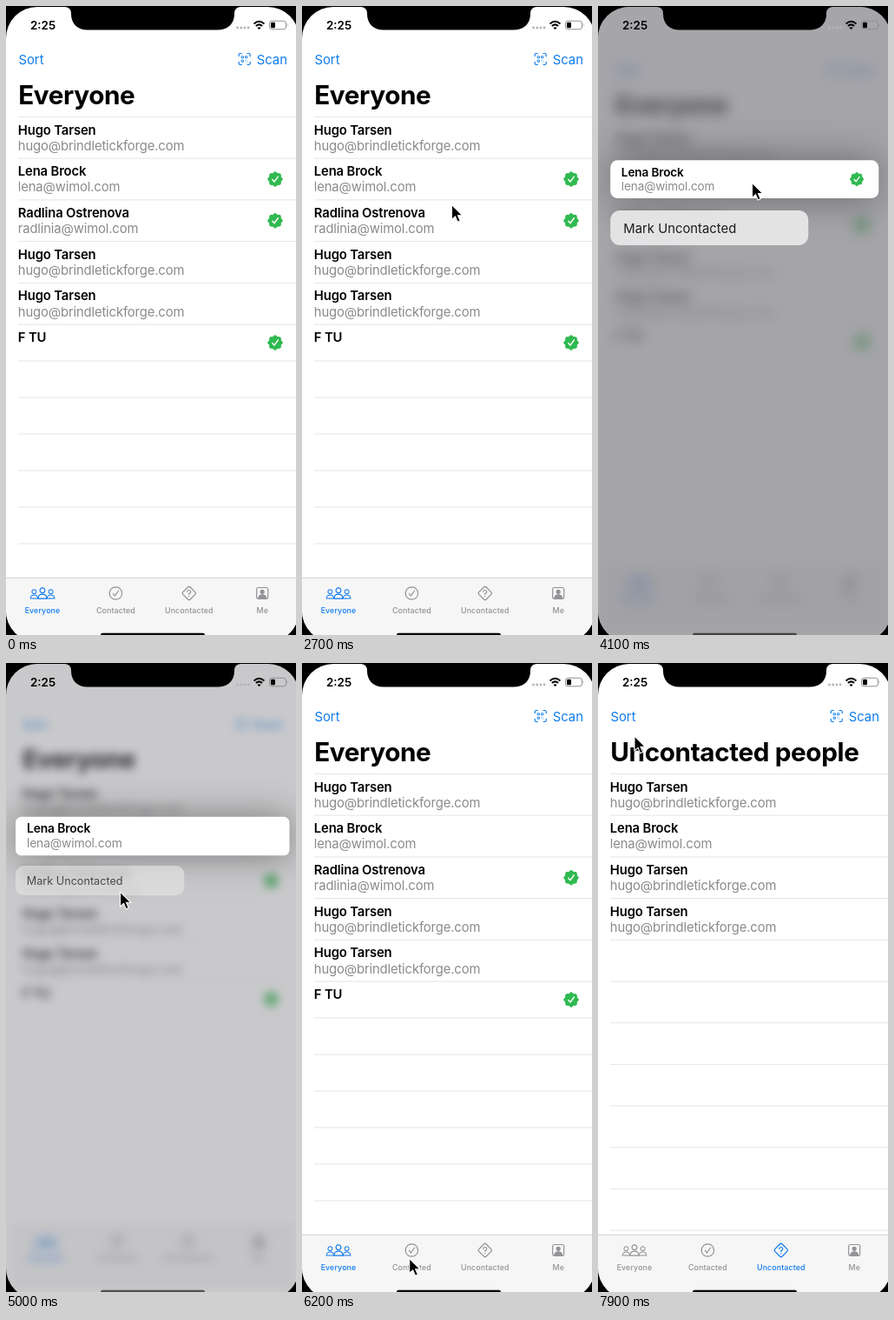
These frames come from a looping animation (334 by 723 pixels, 8 s). An HTML page:

```html
<!DOCTYPE html>
<html lang="en">
<head>
<meta charset="utf-8">
<style>
html, body { margin: 0; width: 100%; height: 100%; overflow: hidden; background: #000; }
svg { display: block; font: 400 14.85px Inter, sans-serif; }
.title { font-size: 29.7px; font-weight: 700; letter-spacing: -.38px; }
.name { font-weight: 600; letter-spacing: -.15px; }
.mail { fill: #8a8a8d; letter-spacing: -.15px; }
.link { fill: #0f7bee; }
.time { font-size: 13.4px; font-weight: 600; }
.tab { font-size: 8.9px; font-weight: 500; letter-spacing: .1px; text-anchor: middle; fill: currentColor; }
.line { fill: none; stroke: currentColor; stroke-width: 1.2; stroke-linecap: round; stroke-linejoin: round; }
</style>
</head>
<body>
<svg width="334" height="723" viewBox="0 0 334 723">
  <clipPath id="screen"><rect y="1" width="337.5" height="730" rx="36"/></clipPath>
  <g clip-path="url(#screen)">
    <rect width="338" height="731" fill="#fff"/>
    <g id="page"></g>
    <rect id="dim" width="338" height="731" fill="#6b6a70"/>
    <g id="lifted"></g>
    <g id="menu">
      <rect width="228" height="40" rx="11" fill="#e3e3e4"/>
      <text x="15" y="25.7" fill="#1c1c1e">Mark Uncontacted</text>
    </g>
    <text class="time" x="28" y="27">2:25</text>
    <g fill="#b5b5b8">
      <circle cx="266.5" cy="25" r="1.4"/><circle cx="270.7" cy="25" r="1.4"/>
      <circle cx="274.9" cy="25" r="1.4"/><circle cx="279.1" cy="25" r="1.4"/>
    </g>
    <g fill="none" stroke="#000" stroke-width="2">
      <path d="M285.6 20.4Q291.5 15 297.4 20.4M287.9 23Q291.5 19.8 295.1 23"/>
      <path d="M291.5 27L289.4 24.9Q291.5 23.4 293.6 24.9Z" fill="#000" stroke="none"/>
    </g>
    <rect x="303.5" y="17.2" width="19" height="9.6" rx="2.8" fill="none" stroke="#8e8e90"/>
    <rect x="305" y="18.7" width="5" height="6.6" rx="1.3"/>
    <path d="M323.8 20.3q1.8 1.7 0 3.4z" fill="#8e8e90"/>
    <rect id="home" x="109" y="720.8" width="120" height="4.5" rx="2.2"/>
  </g>
  <path d="M68 0V1Q75 1.5 75 9C75 20 82 27.5 94 27.5H244C256 27.5 263 20 263 9Q263 1.5 270 1V0Z"/>
  <path id="cursor" d="M0 0V17L4 13.4L6.7 19.7L9.7 18.4L7 12.3H12.4Z" stroke="#fff" stroke-width="1.1"/>
</svg>
<script>
const el = id => document.getElementById(id);
const BLUE = '#0f7bee', GRAY = '#929296', CX = 168.75, CY = 365.5;
const LIST_TOP = 127.5, ROW = 47.7, SHORT_ROW = 42;

const hugo = { name: 'Hugo Tarsen', mail: 'hugo@brindletickforge.com' };
const lena = { name: 'Lena Brock', mail: 'lena@wimol.com' };
const radlina = { name: 'Radlina Ostrenova', mail: 'radlinia@wimol.com', done: true };
const ftu = { name: 'F TU', mail: '', done: true };
const pages = [
  { title: 'Everyone', people: [hugo, lena, radlina, hugo, hugo, ftu] },
  { title: 'Contacted people', people: [radlina, ftu] },
  { title: 'Uncontacted people', people: [hugo, lena, hugo, hugo] }
];

// Icons are drawn around their own centre
const person = (x, y, s) => `<g transform="translate(${x} ${y}) scale(${s})">
  <circle cy="-3.3" r="2.9"/><path d="M-5 6.2Q-5 1.2 0 1.2T5 6.2Z"/></g>`;
const icons = [
  person(-9.6, .9, .84) + person(9.6, .9, .84) + person(0, 0, 1),
  '<circle r="7.2"/><path d="M-3 .4L-.8 3L3.2 -3"/>',
  '<rect x="-5.9" y="-5.9" width="11.8" height="11.8" rx="1.6" transform="rotate(45)"/>' +
  '<path d="M-2 -1.7Q-1.8 -3.5 0 -3.5T2 -1.7Q2 -.5 .8 .1T0 1.5M0 3.7V3.8"/>',
  '<rect x="-6.5" y="-6.5" width="13" height="13" rx="2"/>' +
  '<path d="M-4.4 5.8Q-4 1.8 0 1.8T4.4 5.8Z" fill="currentColor"/><circle cy="-1.6" r="2" fill="currentColor"/>'
];
const tabNames = ['Everyone', 'Contacted', 'Uncontacted', 'Me'];

const seal = [...Array(16)].map((_, i) => {
  const a = i * Math.PI / 8, r = i % 2 ? 7 : 8.5;
  return `${r * Math.sin(a)},${-r * Math.cos(a)}`;
}).join(' ');
const badge = y => `<g transform="translate(310 ${y})">
  <polygon points="${seal}" fill="#30b950" stroke="#30b950" stroke-width="1" stroke-linejoin="round"/>
  <path class="line" style="color:#fff;stroke-width:1.4" d="M-3.2 .5L-1 3L3.3 -3"/></g>`;

function personRow({ name, mail, done }, y) {
  const h = mail ? ROW : SHORT_ROW;
  return `<text class="name" x="13.8" y="${y + 20}">${name}</text>
    <text class="mail" x="13.8" y="${y + 38.2}">${mail}</text>` + (done ? badge(y + h / 2) : '');
}

const scanIcon = `<g class="line" transform="translate(274.7 61)" style="color:${BLUE}">
  ${[0, 90, 180, 270].map(a => `<path d="M-6.5 -3.3V-5Q-6.5 -6.5 -5 -6.5H-3.3" transform="rotate(${a})"/>`).join('')}
  <path stroke-width=".9" d="M-3.2 -3.2h2v2h-2zM1.2 -3.2h2v2h-2zM-3.2 1.2h2v2h-2zM1.4 1.4h.2M3.1 3.1h.1"/></g>`;

function drawPage(index, lifted) {
  const { title, people } = pages[index];
  let y = LIST_TOP, h, out = `<text class="link" x="14.4" y="66.5">Sort</text>${scanIcon}
    <text class="link" x="288.7" y="66.5">Scan</text>
    <text class="title" x="14.2" y="113">${title}</text>`;
  const line = () => out += `<path d="M13.8 ${y}H338" stroke="#e3e3e5" stroke-width=".9"/>`;
  line();
  for (const p of people) {
    if (!(lifted && p === lena)) out += personRow(p, y);
    h = p.mail ? ROW : SHORT_ROW;
    y += h;
    line();
  }
  while ((y += h) < 657) line();
  out += '<rect y="657" width="338" height="74" fill="#f6f6f7"/><path d="M0 657.3H338" stroke="#c9c9cc" stroke-width=".8"/>';
  tabNames.forEach((label, i) => {
    out += `<g transform="translate(${42 + 84.4 * i} 675)" style="color:${i === index ? BLUE : GRAY}">
      <g class="line">${icons[i]}</g><text class="tab" y="23">${label}</text></g>`;
  });
  return out;
}

const ramp = (t, a, b) => Math.min(1, Math.max(0, (t - a) / (b - a)));
const smooth = x => x * x * (3 - 2 * x);

// Pointer stops: time, x, y
const stops = [
  [2500, 168, 250], [2700, 172.5, 228.5], [3300, 177.5, 203.3], [4500, 177.5, 203.3], [4850, 131.5, 263],
  [5500, 131.5, 263], [6150, 123.7, 684.5], [6500, 123.7, 684.5], [7200, 201, 689], [7400, 201, 689], [7900, 42, 84]
];
function pointer(t) {
  let i = 0;
  while (i < stops.length - 2 && t >= stops[i + 1][0]) i++;
  const [a, x, y] = stops[i], [b, u, v] = stops[i + 1], k = smooth(ramp(t, a, b));
  return [x + (u - x) * k, y + (v - y) * k];
}

let shown;
function render(t) {
  const index = t < 6300 ? 0 : t < 7400 ? 1 : 2;
  const lift = ramp(t, 3650, 3780) * (1 - ramp(t, 5350, 5450));
  const open = smooth(ramp(t, 3800, 4090)) * (1 - ramp(t, 4900, 5350));
  lena.done = t < 4900;

  const key = [index, lift > 0, lena.done].join();
  if (key !== shown) {
    shown = key;
    const top = LIST_TOP + ROW;
    el('page').innerHTML = drawPage(index, lift > 0);
    el('lifted').innerHTML = `<rect id="card" y="${top}" width="337.5" height="${ROW}" fill="#fff"/>` + personRow(lena, top);
  }

  const zoom = (id, s, cy) => el(id).setAttribute('transform', `translate(${CX} ${cy}) scale(${s}) translate(${-CX} ${-cy})`);
  const rowScale = 1 - .0844 * open;
  zoom('page', 1 - .042 * open, CY);
  el('page').style.filter = open ? `blur(${8 * open ** 1.5}px)` : 'none';
  el('dim').setAttribute('opacity', .6 * open ** 2);
  el('home').setAttribute('opacity', 1 - .4 * lift);

  zoom('lifted', rowScale, LIST_TOP + ROW * 1.5);
  el('lifted').style.display = lift ? '' : 'none';
  el('lifted').style.filter = `drop-shadow(0 0 ${9 + 16 * open}px rgba(0,0,0,${(.5 - .12 * open) * lift}))`;
  el('card').setAttribute('rx', 9 * open);

  const grow = Math.max(0, 1 - .66 * (1 - open));
  el('menu').setAttribute('transform', `translate(${CX * (1 - rowScale)} ${226 + 9 * open}) scale(${grow})`);
  el('menu').setAttribute('opacity', open ** 1.5);

  el('cursor').style.display = t < 2500 ? 'none' : '';
  el('cursor').setAttribute('transform', `translate(${pointer(t)})`);
}

const start = performance.now();
(function tick() {
  render((performance.now() - start) % 8000);
  requestAnimationFrame(tick);
})();
</script>
</body>
</html>
```
